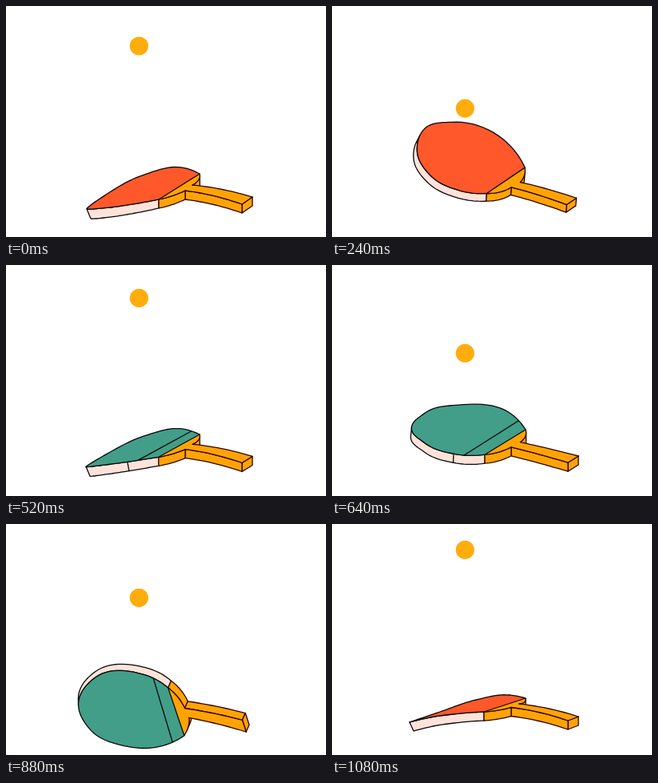
Animation, 400 px wide and 289 px high, one loop 1120 ms. Source, as an HTML page with a canvas:

```html
<!DOCTYPE html>
<html lang="en">
<head>
<meta charset="utf-8">
<title>Paddle and ball</title>
<style>
  html, body { margin: 0; width: 100%; height: 100%; overflow: hidden; background: #fff; }
  canvas { display: block; width: 400px; height: 289px; }
</style>
</head>
<body>
<canvas id="stage"></canvas>
<script>
const LOOP = 1120, STEP = 40, W = 400, H = 289;
const RED = '#ff582b', GREEN = '#429e88', ORANGE = '#ffa305', RIM = '#ffe3da', BALL = '#ffad0d';
const INK = '#080808', GRIP_INK = '#2e0206';

const canvas = document.getElementById('stage');
const ctx = canvas.getContext('2d');
const dpr = window.devicePixelRatio || 1;
canvas.width = W * dpr;
canvas.height = H * dpr;

// Pose: 8 blade points, 6 neck and grip points, then tip depth, grip depth, grip bend.
const edgeOn = [
  190,235, 151,238, 125,241.5, 97,248, 135,235, 180,220, 222,214, 242,218,
  243,224, 234,225, 308,241, 295,246, 224,229.5, 207,234, 5,11, 0,11, 0,-4];
const opening = [
  191,242, 152,249, 126,252.5, 101,254, 128,234, 170,212, 225,203, 242,210,
  244,218, 233,224, 308,239, 295,248, 224,231, 207,239, 5,12, 0,11, 0,-4];
const flat = [
  191,236, 152,233, 113,215, 99,192, 112,174, 155,166, 226,184, 242,205,
  245,214, 236,221, 308,239, 295,247, 224,227, 209,235, -2.5,11, 0,11, 0,0];
const raised = [
  192,233, 155,228, 122,209, 106.5,178, 117,150, 150,143, 226,175, 243,202,
  244,212, 236,220, 306,240, 293,248, 224,226, 210,234, -5,9, -1,10.5, 0,-2];
const facing = [
  224,266, 202,278, 150,280.5, 104,259, 89.5,227, 110,194, 167,188, 201,205,
  215,215, 223,231, 295,245.5, 300.5,260.5, 229,243, 231,253, 0,-8, 4,-9.5, 0,-2];

const lerp = (a, b, k) => a + (b - a) * k;
const add = (a, b) => [a[0] + b[0], a[1] + b[1]];
const sub = (a, b) => [a[0] - b[0], a[1] - b[1]];
const mul = (a, k) => [a[0] * k, a[1] * k];
const dot = (a, b) => a[0] * b[0] + a[1] * b[1];
const len = a => Math.hypot(a[0], a[1]) || 1e-6;
const unit = a => mul(a, 1 / len(a));
const clamp01 = x => Math.max(0, Math.min(1, x));

const pairs = list => Array.from({ length: list.length / 2 }, (_, i) => [list[2 * i], list[2 * i + 1]]);

function depthAt(pose, p) {
  const k = clamp01((p[0] - 100) / 90);
  return [lerp(pose[14][0], pose[15][0], k), lerp(pose[14][1], pose[15][1], k)];
}

// The same solid described from its other face.
function flip(pose) {
  const back = pose.slice(0, 14).map(p => add(p, depthAt(pose, p)));
  return [...back.slice(0, 8).reverse(), ...back.slice(8).reverse(),
    mul(pose[14], -1), mul(pose[15], -1), pose[16]];
}

const first = pairs(edgeOn);
const keys = [
  [0.01, first], [0.086, pairs(opening)], [0.314, pairs(flat)],
  [0.538, pairs(raised)], [0.8, pairs(facing)], [1.01, flip(first)]
];

function poseAt(q) {
  let i = 0;
  while (i < keys.length - 2 && q >= keys[i + 1][0]) i++;
  const [t0, a] = keys[i], [t1, b] = keys[i + 1];
  let k = clamp01((q - t0) / (t1 - t0));
  if (i === 3) k += 0.45 * Math.sin(Math.PI * k); // swing past, then settle
  return a.map((p, j) => [lerp(p[0], b[j][0], k), lerp(p[1], b[j][1], k)]);
}

function bezier(a, b, c, d, n = 12) {
  return Array.from({ length: n + 1 }, (_, i) => {
    const t = i / n, u = 1 - t;
    return [0, 1].map(x =>
      u * u * u * a[x] + 3 * u * u * t * b[x] + 3 * u * t * t * c[x] + t * t * t * d[x]);
  });
}

function arc(a, c, b) {
  return bezier(a, add(a, mul(sub(c, a), 2 / 3)), add(b, mul(sub(c, b), 2 / 3)), b);
}

function bent(a, b, bend) {
  return arc(a, add(mul(add(a, b), 0.5), bend), b);
}

// Smooth curve through points; sharp turns become corners.
function smooth(pts) {
  const last = pts.length - 1, tan = [], soft = [];
  for (let i = 1; i < last; i++) {
    const u = sub(pts[i], pts[i - 1]), v = sub(pts[i + 1], pts[i]);
    tan[i] = unit(add(mul(u, 1 / dot(u, u)), mul(v, 1 / dot(v, v))));
    soft[i] = clamp01(dot(unit(u), unit(v)) + 1);
  }
  const mirror = (t, u) => sub(mul(u, 2 * dot(u, t)), t);
  tan[0] = mirror(tan[1], unit(sub(pts[1], pts[0])));
  tan[last] = mirror(tan[last - 1], unit(sub(pts[last], pts[last - 1])));
  soft[0] = soft[last] = 1;
  const out = [pts[0]];
  for (let i = 0; i < last; i++) {
    const r = len(sub(pts[i + 1], pts[i])) * 0.35;
    const c1 = add(pts[i], mul(tan[i], r * soft[i]));
    const c2 = sub(pts[i + 1], mul(tan[i + 1], r * soft[i + 1]));
    out.push(...bezier(pts[i], c1, c2, pts[i + 1]).slice(1));
  }
  return out;
}

function area(pts) {
  return pts.reduce((sum, p, i) => {
    const q = pts[(i + 1) % pts.length];
    return sum + p[0] * q[1] - q[0] * p[1];
  }, 0);
}

function trace(pts, fill, ink, close) {
  ctx.beginPath();
  pts.forEach(p => ctx.lineTo(p[0], p[1]));
  if (close) ctx.closePath();
  if (fill) { ctx.fillStyle = fill; ctx.fill(); }
  if (ink) { ctx.strokeStyle = ink; ctx.stroke(); }
}

// Draw those parts of an edge's side wall that face the viewer.
function drawWall(pose, pts, fill, ink) {
  let run = [];
  const flush = () => {
    if (run.length > 1) {
      const back = run.map(p => add(p, depthAt(pose, p))).reverse();
      trace([...run, ...back], fill, ink, true);
    }
    run = [];
  };
  for (let i = 0; i < pts.length - 1; i++) {
    const e = sub(pts[i + 1], pts[i]);
    if (dot(depthAt(pose, pts[i]), [e[1], -e[0]]) > 0) {
      if (!run.length) run.push(pts[i]);
      run.push(pts[i + 1]);
    } else flush();
  }
  flush();
}

function drawPaddle(pose, green) {
  if (area(smooth(pose.slice(0, 8))) < 0) {
    pose = flip(pose);
    green = !green;
  }
  const blade = smooth(pose.slice(0, 8));
  const [near, , , , , , , far, farCtl, neckFar, endFar, endNear, neckNear, nearCtl] = pose;
  const grip = [
    arc(far, farCtl, neckFar),
    bent(neckFar, endFar, pose[16]),
    [endFar, endNear],
    bent(endNear, neckNear, pose[16]),
    arc(neckNear, nearCtl, near)
  ];

  drawWall(pose, blade, RIM, INK);
  const mark = green ? pose[1] : pose[6];
  trace([mark, add(mark, depthAt(pose, mark))], null, INK);
  grip.forEach(g => drawWall(pose, g, ORANGE, GRIP_INK));

  trace([...blade, ...grip.flat()], ORANGE);
  grip.forEach(g => trace(g, null, GRIP_INK));
  trace(blade, green ? GREEN : RED, INK, true);
  if (green) trace([blade[8], blade[blade.length - 8]], null, INK);
}

// Start and end time, start and end height, exponent of the curve measured from the top.
const flights = [
  [-45, 170, 31, 180, 1.33],
  [170, 480, 180, 31, 1.69],
  [480, 725, 31, 180, 1.49],
  [725, 1075, 180, 31, 1.53],
  [1075, 1290, 31, 180, 1.33]
];

function ballY(t) {
  const [t0, t1, y0, y1, pow] = flights.find(f => t < f[1]);
  const k = (t - t0) / (t1 - t0);
  return y0 < y1 ? y0 + (y1 - y0) * k ** pow : y1 + (y0 - y1) * (1 - k) ** pow;
}

function draw(t) {
  ctx.setTransform(dpr, 0, 0, dpr, 0, 0);
  ctx.fillStyle = '#fff';
  ctx.fillRect(0, 0, W, H);
  ctx.lineWidth = 1.3;
  ctx.lineJoin = ctx.lineCap = 'round';

  const green = t >= 480 && t < 1075;
  const q = green ? (t - 480) / 595 : ((t + 45) % LOOP) / 525;
  drawPaddle(poseAt(q), green);

  ctx.fillStyle = BALL;
  ctx.beginPath();
  ctx.arc(166.3, ballY(t) + 0.4, 11.6, 0, 2 * Math.PI);
  ctx.fill();
}

const start = performance.now();
function tick() {
  const t = Math.max(0, performance.now() - start) % LOOP;
  draw(Math.floor(t / STEP) * STEP);
  requestAnimationFrame(tick);
}
tick();
</script>
</body>
</html>
```
